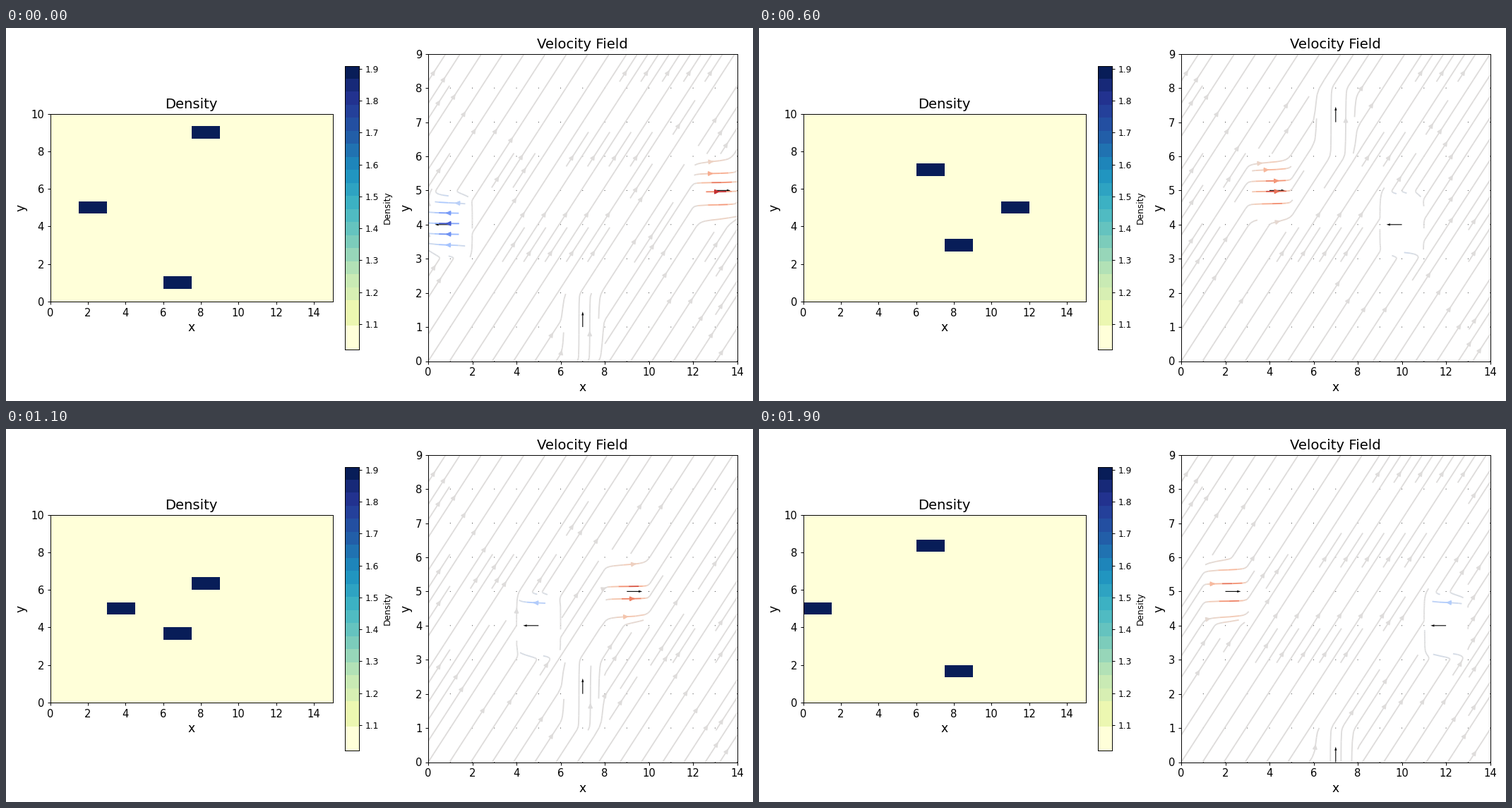
A matplotlib script for the animation above (2000 ms loop, 1058 by 529 pixels).

```python
import numpy as np
import matplotlib.pyplot as plt
from matplotlib.animation import FuncAnimation

W, H = 1058, 529
NX, NY = 15, 10          # lattice size
FRAMES, INTERVAL = 20, 100
DRIFT = 0.01             # weak diagonal background flow
LOW, HIGH = 1.0194, 1.9097

plt.rcParams["font.family"] = "DejaVu Sans"
fig = plt.figure(figsize=(12, 6), dpi=W / 12, facecolor="white")


def pixel_axes(left, top, right, bottom):
    return fig.add_axes([left / W, 1 - bottom / H,
                         (right - left) / W, (bottom - top) / H])


def decorate(ax, title, xmax, ymax, ystep):
    ax.set_title(title, fontsize=16)
    ax.set_xlabel("x", fontsize=14)
    ax.set_ylabel("y", fontsize=14)
    ax.set_xlim(0, xmax)
    ax.set_ylim(0, ymax)
    ax.set_xticks(range(0, 15, 2))
    ax.set_yticks(range(0, ymax + 1, ystep))
    ax.tick_params(labelsize=12)


def movers(step):
    """Cell (x, y) and velocity (u, v) of the three moving parcels."""
    return [((13 + step) % NX, 5, 1, 0),
            ((1 - step) % NX, 4, -1, 0),
            (7, (1 + step) % NY, 0, 1)]


def fields(step):
    rho = np.full((NX, NY), LOW)
    u = np.full((NY, NX), DRIFT)
    v = np.full((NY, NX), DRIFT)
    for x, y, du, dv in movers(step):
        rho[x, y] = HIGH
        u[y, x], v[y, x] = du, dv
    return rho, u, v


def draw_colorbar(ax):
    # two wide pale bands, then even ones
    span = HIGH - LOW
    edges = np.concatenate(([LOW, LOW + span * 34 / 403],
                            np.linspace(LOW + span * 70 / 403, HIGH, 19)))
    mids = (edges[:-1] + edges[1:]) / 2
    mids[0], mids[-1] = LOW, HIGH
    ax.pcolormesh([0, 1], edges, mids[:, None], cmap="YlGnBu",
                  vmin=LOW, vmax=HIGH)
    ax.set_ylim(LOW, HIGH)
    ax.set_xticks([])
    ax.set_yticks(np.arange(11, 20) / 10)
    ax.yaxis.tick_right()
    ax.yaxis.set_label_position("right")
    ax.set_ylabel("Density", fontsize=10)


density_ax = pixel_axes(62.5, 121.5, 462.5, 388)
bar_ax = pixel_axes(480, 53.5, 500.3, 456.3)
flow_ax = pixel_axes(598, 36.7, 1035.6, 472.5)

image = density_ax.imshow(fields(0)[0], cmap="YlGnBu", vmin=LOW, vmax=HIGH,
                          origin="lower", extent=[0, 15, 0, 10],
                          aspect="auto", interpolation="nearest")
decorate(density_ax, "Density", 15, 10, 2)
draw_colorbar(bar_ax)
X, Y = np.meshgrid(np.arange(NX), np.arange(NY))


def update(step):
    rho, u, v = fields(step)
    image.set_data(rho)
    flow_ax.clear()
    flow_ax.quiver(X, Y, u, v, scale=20, width=0.0025)
    flow_ax.streamplot(X, Y, u, v, color=u, cmap="coolwarm")
    decorate(flow_ax, "Velocity Field", 14, 9, 1)
    return []


anim = FuncAnimation(fig, update, frames=FRAMES, interval=INTERVAL,
                     init_func=lambda: [], repeat=True, repeat_delay=0)
plt.show()
```
